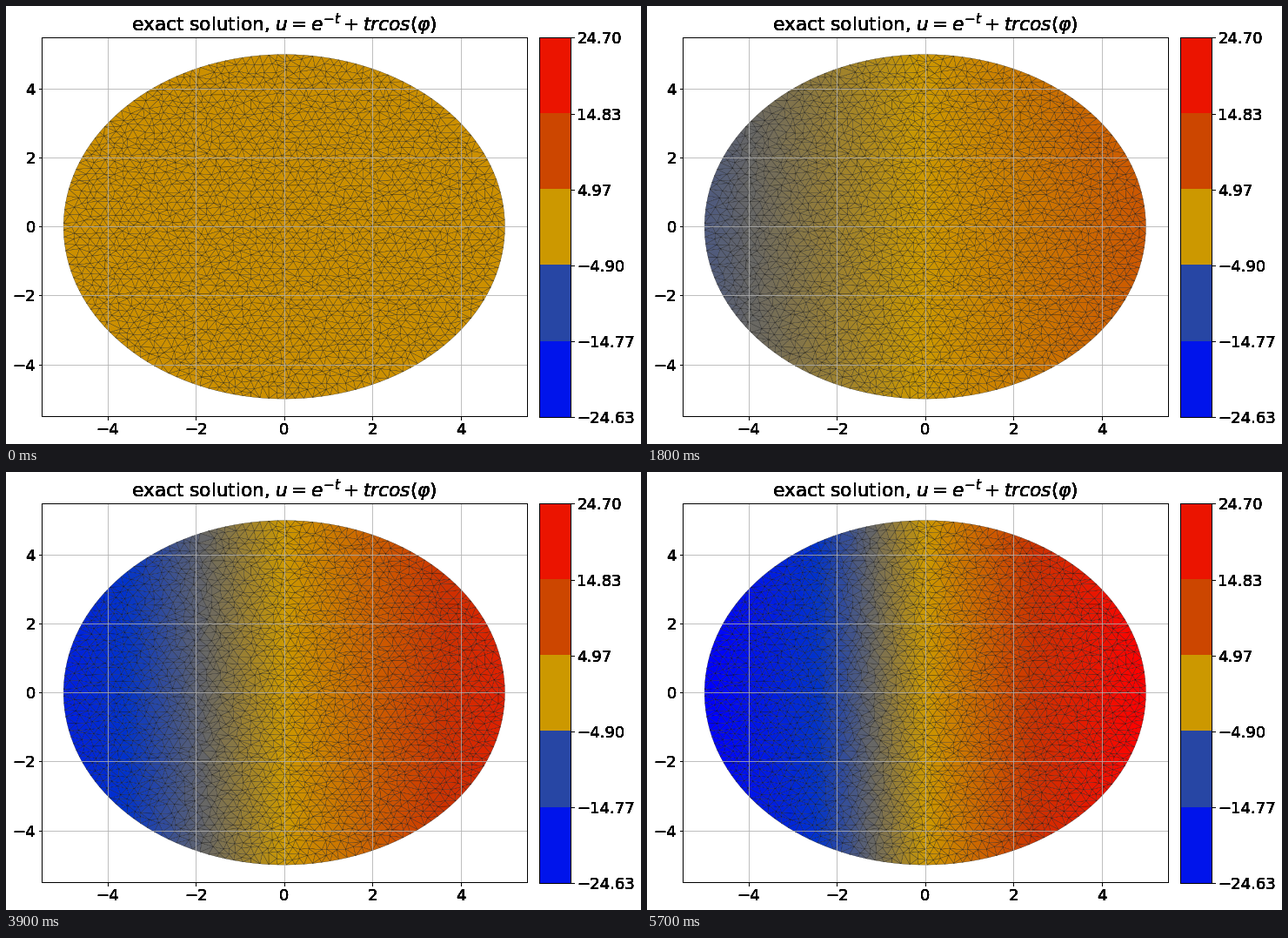
Recreate the animation shown at these times as a matplotlib script. Size 730 by 503 pixels, loop 6000 ms.

```python
import numpy as np
import matplotlib.pyplot as plt
from matplotlib.animation import FuncAnimation
from matplotlib.colors import LinearSegmentedColormap, Normalize
from matplotlib.tri import Triangulation

W, H, DPI = 730, 503, 72
FRAMES, INTERVAL = 20, 300
RADIUS, STEP = 5.0, 0.2
LOW, HIGH = -24.634, 24.70
T_END = 5.0
TEXT_LAYERS = 8  # stacked labels give the heavy, crisp lettering

plt.rcParams["font.family"] = "DejaVu Sans"
plt.rcParams["font.size"] = 18

cmap = LinearSegmentedColormap.from_list(
    "heat",
    [(0, 0, 1), (0, 0.2, 0.8), (0.8, 0.6, 0), (0.8, 0.2, 0), (1, 0, 0)],
)
norm = Normalize(LOW, HIGH)


def disk_mesh():
    """Unstructured triangulation of the disk from a jittered hexagonal grid."""
    rng = np.random.default_rng(7)
    row = STEP * np.sqrt(3) / 2
    n = int(RADIUS / row) + 2
    j, i = np.mgrid[-n:n + 1, -n:n + 1]
    x = (i + 0.5 * (j % 2)) * STEP
    y = j * row
    pts = np.column_stack([x.ravel(), y.ravel()])
    pts += rng.uniform(-0.3, 0.3, pts.shape) * STEP
    pts = pts[np.hypot(*pts.T) < RADIUS - 0.55 * STEP]
    a = np.linspace(0, 2 * np.pi, int(2 * np.pi * RADIUS / STEP), endpoint=False)
    rim = RADIUS * np.column_stack([np.cos(a), np.sin(a)])
    return Triangulation(*np.vstack([pts, rim]).T)


def pixel_axes(left, top, right, bottom):
    box = [left / W, 1 - bottom / H, (right - left) / W, (bottom - top) / H]
    ax = fig.add_axes(box)
    ax.set_facecolor("none")
    return ax


def plot_axes():
    ax = pixel_axes(40.8, 35.9, 598.8, 470.9)
    ax.set(xlim=(-5.5, 5.5), ylim=(-5.5, 5.5))
    ax.set_xticks(range(-4, 5, 2))
    ax.set_yticks(range(-4, 5, 2))
    ax.set_title(r"exact solution, $u = e^{-t} + trcos(\varphi)$")
    return ax


def bar_axes():
    ax = pixel_axes(613.2, 36.4, 649.2, 472.4)
    ticks = np.linspace(LOW, HIGH, 6)
    ax.set(xlim=(0, 1), ylim=(LOW, HIGH))
    ax.set_xticks([])
    ax.yaxis.tick_right()
    ax.set_yticks(ticks, [f"{v:.2f}".replace("-", "\u2212") for v in ticks])
    return ax


fig = plt.figure(figsize=((W + 0.001) / DPI, (H + 0.001) / DPI), dpi=DPI,
                 facecolor="white")

plots = [plot_axes() for _ in range(TEXT_LAYERS)]
bars = [bar_axes() for _ in range(TEXT_LAYERS)]

bands = (np.arange(5) + 0.5) / 5 * (HIGH - LOW) + LOW
bars[0].imshow(bands[:, None], cmap=cmap, norm=norm, origin="lower",
               extent=(0, 1, LOW, HIGH), aspect="auto",
               interpolation="nearest")

mesh = disk_mesh()
center_x = mesh.x[mesh.triangles].mean(axis=1)


def solution(t):
    return np.exp(-t) + t * center_x


surface = plots[0].tripcolor(mesh, facecolors=solution(0), cmap=cmap, norm=norm,
                             edgecolors="k", linewidth=0.25)
plots[0].set(xlim=(-5.5, 5.5), ylim=(-5.5, 5.5))
plots[0].grid(True)  # tripcolor switches the grid off, so it comes last


def update(k):
    surface.set_array(solution(T_END * k / (FRAMES - 1)))
    return [surface]


anim = FuncAnimation(fig, update, frames=FRAMES, interval=INTERVAL,
                     repeat=True, repeat_delay=0, blit=False)
plt.show()
```
